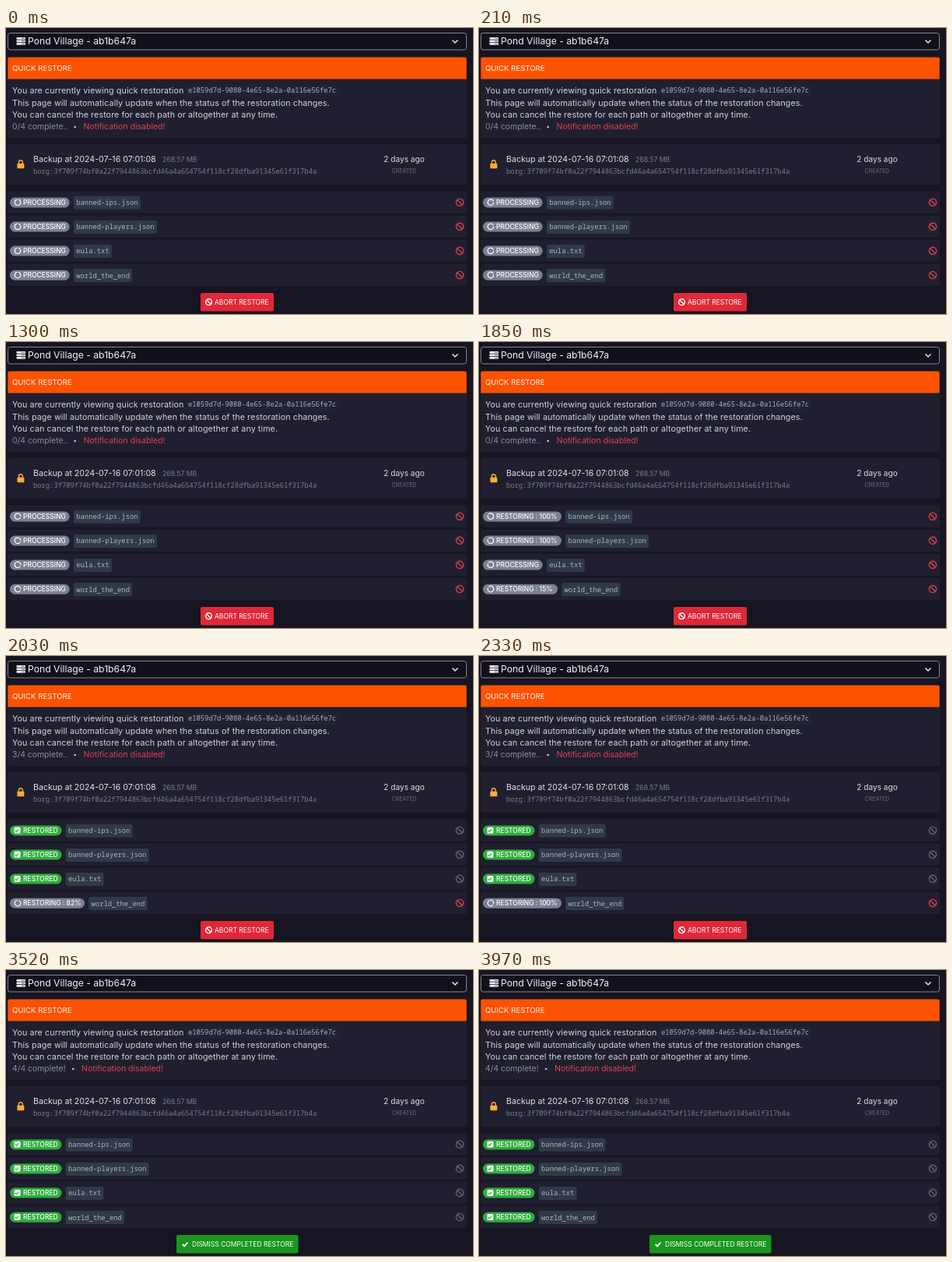
Animation, 600 px wide and 367 px high, one loop 4030 ms. Source, as an HTML page:

```html
<!DOCTYPE html>
<html lang="en">
<meta charset="utf-8">
<title>Quick restore</title>
<style>
html, body { margin: 0; width: 100%; height: 100%; overflow: hidden; background: #161521; }
svg { display: block; width: 600px; height: 367px; font-family: Inter, Roboto, sans-serif; white-space: pre; }
.mono { font: 8.8px "Noto Sans Mono", "DejaVu Sans Mono", monospace; }
.wide { letter-spacing: .1px; }
</style>
<svg viewBox="0 0 600 367"><g id="page"></g><g id="live"></g></svg>
<script>
const LOOP = 4030, RESTORING = 1790, MOST_DONE = 1940, ALL_DONE = 2400, POLL = 60, SPIN = 1000;
const PANEL = '#1f1f2f', RED = '#e04250', GREY = '#8a8b98';
const files = ['banned-ips.json', 'banned-players.json', 'eula.txt', 'world_the_end'];

const text = (x, y, s, size, fill = '#d3d4de', more = '') =>
  `<text x="${x}" y="${y}" font-size="${size}" fill="${fill}" ${more}>${s}</text>`;
const mono = (x, y, s, fill) => `<text class="mono" x="${x}" y="${y}" fill="${fill}">${s}</text>`;
const rect = (x, y, w, h, fill, r = 0, more = '') =>
  `<rect x="${x}" y="${y}" width="${w}" height="${h}" rx="${r}" fill="${fill}" ${more}/>`;
const path = (d, stroke, width, more = '') =>
  `<path d="${d}" fill="none" stroke="${stroke}" stroke-width="${width}" ${more}/>`;
const ban = (x, y, r, color) =>
  path(`M${x - r} ${y}a${r} ${r} 0 1 1 ${2 * r} 0a${r} ${r} 0 1 1 ${-2 * r} 0M${x - r * .7} ${y - r * .7}l${r * 1.4} ${r * 1.4}`, color, 1.4);
const spinner = (x, y, angle) =>
  path('M-1.2 -3.6A3.8 3.8 0 1 0 1.2 -3.6', '#fff', 1.2, `stroke-linecap="round" transform="translate(${x} ${y}) rotate(${angle})"`);
const check = (x, y, color, k = 1) =>
  path(`M${x - 2.5 * k} ${y}l${1.8 * k} ${1.8 * k}l${3.4 * k} ${-3.6 * k}`, color, 1.4 * k);
const medium = 'font-weight="500"', centered = 'text-anchor="middle"';

const server = [12, 15.5, 19].map(y =>
  rect(13.5, y, 11.5, 2.8, '#f0f0f5', .8) + rect(20.5, y + .9, 1, 1, '#12111b') + rect(22.5, y + .9, 1, 1, '#12111b')).join('');

const intro = [
  'You are currently viewing quick restoration',
  'This page will automatically update when the status of the restoration changes.',
  'You can cancel the restore for each path or altogether at any time.',
].map((s, i) => text(8, 83.9 + 15.6 * i, s, 10.7, '#d3d4de', 'class="wide"')).join('');

page.innerHTML =
  rect(2.5, 6.5, 589, 21.5, '#12111b', 3, 'stroke="#858596"') + server +
  text(28, 21, 'Pond Village - ab1b647a', 12.2, '#f0f0f5') +
  path('M573.5 15.5l3.5 3.5l3.5 -3.5', '#e8e8ee', 1.5) +
  rect(2, 38, 590, 103, PANEL, 2) +
  '<path d="M2.3 65.6V39.4a2 2 0 0 1 2 -2H589.7a2 2 0 0 1 2 2V65.6z" fill="#fd5200"/>' +
  text(8, 55.2, 'QUICK RESTORE', 9.6, '#fff0e6') + intro +
  rect(231, 73, 196, 15, '#212333', 2) +
  mono(234, 83.2, 'e1059d7d-9080-4e65-8e2a-0a116e56fe7c', '#a9b0bc') +
  rect(2, 149, 590, 52, PANEL, 3) +
  path('M16.4 174.2v-2a2.5 2.5 0 0 1 5 0v2', '#ffac33', 1.4) + rect(14.4, 173.8, 9, 6.4, '#ffac33', 1) +
  text(35, 171.8, 'Backup at 2024-07-16 07:01:08', 10.6, '#e2e3ea') +
  text(201, 171.5, '268.57 MB', 8.7, '#7c7d8a') +
  mono(35, 187, 'borg:3f709f74bf0a22f7944863bcfd46a4a654754f118cf28dfba91345e61f317b4a', '#7c7d8a') +
  text(511.5, 172.2, '2 days ago', 10.1, '#dcdde5', centered) +
  text(511.5, 186.3, 'CREATED', 7, '#6c6d7b', centered) +
  files.map((f, i) => rect(2, 209.3 + 31.1 * i, 590, 28.5, PANEL, 3)).join('');

function row(name, i, t) {
  const y = 223.7 + 31.1 * i, last = i === 3;
  const done = t >= (last ? ALL_DONE : MOST_DONE);
  let label = 'PROCESSING', width = 76.7;
  if (done) {
    label = 'RESTORED';
    width = 66.5;
  } else if (t >= RESTORING && i !== 2) {
    const polls = Math.floor((t - 1850) / POLL);
    const percent = last ? Math.max(0, Math.min(100, Math.round(15 + polls * 67 / 3))) : 100;
    label = `RESTORING : ${percent}%`;
    width = 86 + 5 * String(percent).length;
  }
  const x = 5 + width + 5.3;
  return rect(5, y - 6.3, width, 13, done ? '#2fae3d' : '#7b8191', 6.5) +
    (done ? rect(10.5, y - 4, 8, 8, '#fff', 1.5) + check(14, y + .2, '#2fae3d', .9) : spinner(15, y, t / SPIN * 360)) +
    text(22, y + 3.2, label, 8.5, '#fff', medium) +
    rect(x, y - 7.9, name.length * 5.28 + 6.5, 17, '#303a47', 2) + mono(x + 3.3, y + 3.5, name, '#abb5bf') +
    ban(583, y, 4.6, done ? '#666773' : RED);
}

function draw(t) {
  const all = t >= ALL_DONE, shift = all ? -2.5 : 0;
  const status = all ? '4/4 complete!' : (t >= MOST_DONE ? 3 : 0) + '/4 complete..';
  live.innerHTML =
    text(8, 130.4, status, 10.4, GREY) + `<circle cx="${88.7 + shift}" cy="127" r="1.3" fill="#c6c7d0"/>` +
    text(99.5 + shift, 130.4, 'Notification disabled!', 10.5, RED) +
    files.map((f, i) => row(f, i, t)).join('') +
    (all
      ? rect(219, 340, 156.5, 23.5, '#1a961e', 2) + check(230, 352, '#fff', 1.3) +
        text(239, 354.8, 'DISMISS COMPLETED RESTORE', 8.5, '#fff')
      : rect(250, 340, 94, 23.5, '#df2838', 2) + ban(260.5, 351.7, 3.9, '#fff') +
        text(268, 354.8, 'ABORT RESTORE', 8.5, '#fff'));
}

const start = performance.now();
function frame() {
  draw((performance.now() - start) % LOOP);
  requestAnimationFrame(frame);
}
frame();
</script>
</html>
```
